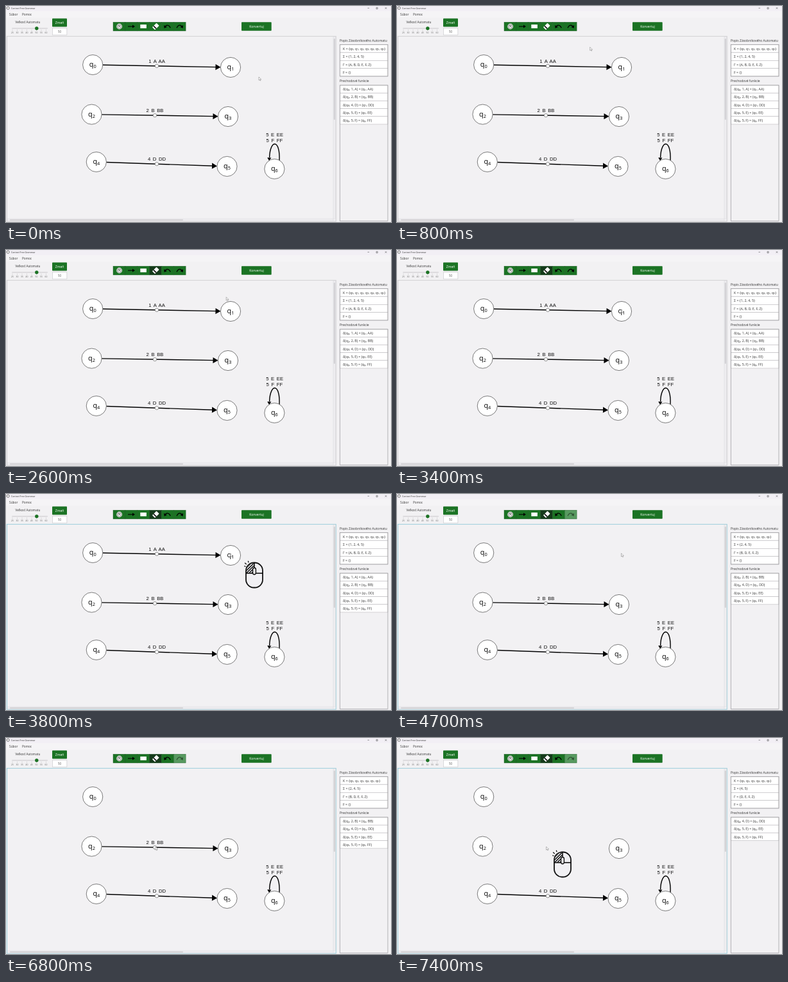
Recreate the animation shown at these times as an HTML page. Size 600 by 338 pixels, loop 8000 ms.

```html
<!DOCTYPE html>
<html lang="sk">
<head>
<meta charset="utf-8">
<title>Context Free Grammar</title>
<style>
  html, body { margin: 0; width: 100%; height: 100%; overflow: hidden; background: #f2f1f3; }
  svg { display: block; width: 600px; height: 338px; font-family: "Open Sans", "Noto Sans", sans-serif; fill: #333; }
  .tape { font: 7.7px "Liberation Sans", sans-serif; word-spacing: 1.5px; fill: #111; }
  .mid { text-anchor: middle; }
  .line { fill: none; stroke: #000; }
</style>
</head>
<body>
<svg id="stage" viewBox="0 0 600 338"></svg>
<script>
const LOOP = 8000, STEP = 100;
const GREEN = '#1b7324', DARK = '#143a1a', PALE = '#589a60';
const FOCUS_AT = 3600, CUTS = [3900, 7200];

const rect = (x, y, w, h, fill, more = '') =>
  `<rect x="${x}" y="${y}" width="${w}" height="${h}" fill="${fill}" ${more}/>`;
const text = (x, y, size, s, more = '') =>
  `<text x="${x}" y="${y}" font-size="${size}" ${more}>${s}</text>`;
const path = (d, more = '') => `<path d="${d}" ${more}/>`;
const group = (id, body, more = '') => `<g id="${id}" ${more}>${body}</g>`;

// Sets the digit after each q as a subscript
const subs = (s, size) => s.replace(/q(\d)(.?)/g, (_, n, next) =>
  `q<tspan dy="${size * .15}" font-size="${size * .68}">${n}</tspan>` +
  `<tspan dy="${-size * .15}">${next}</tspan>`);

const nodes = [[135.2, 92], [350, 96], [133.5, 169.6], [346, 173], [140.8, 244], [344.5, 251], [418.4, 255]];
const edges = [[0, 1, '1 A AA'], [2, 3, '2 B BB'], [4, 5, '4 D DD']];
const rules = [
  'δ(q0, 1, A) = (q1, AA)', 'δ(q2, 2, B) = (q3, BB)', 'δ(q4, 4, D) = (q5, DD)',
  'δ(q6, 5, E) = (q6, EE)', 'δ(q6, 5, F) = (q6, FF)'
];

function node([x, y], i) {
  return group('node' + i,
    `<circle cx="${x}" cy="${y}" r="15.6" fill="#fff" stroke="#444" stroke-width=".7"/>` +
    text(x, y + 3.4, 10.8, subs('q' + i, 10.8), 'class="mid" fill="#000"'));
}

function edge([from, to, label], i) {
  const [ax, ay] = nodes[from], [bx, by] = nodes[to];
  const len = Math.hypot(bx - ax, by - ay);
  const angle = Math.atan2(by - ay, bx - ax) * 180 / Math.PI;
  const mx = [235, 232, 235][i], my = ay + (by - ay) * (mx - ax) / (bx - ax);
  const tip = len - 15.5;
  return group('edge' + i,
    `<g transform="translate(${ax} ${ay}) rotate(${angle})">` +
    path(`M15.7 0H${tip - 6}`, 'class="line" stroke-width="1.4"') +
    path(`M${tip} 0l-8-4.6v9.2z`, 'fill="#000"') + '</g>' +
    `<circle cx="${mx}" cy="${my}" r="2.7" fill="#fff" stroke="#555" stroke-width=".6"/>` +
    `<text class="tape mid" x="${mx}" y="${my - 5}">${label}</text>`);
}

function header() {
  let s = rect(0, 0, 600, 8, '#f2eff5') + rect(0, 8, 600, 10, '#f5f4f6');
  s += '<circle cx="3.2" cy="3.2" r="2" fill="#fff" stroke="#333" stroke-width=".7"/>' +
    text(8, 4.5, 3.5, 'Context Free Grammar');
  s += path('M563.5 3.3h2.6M577 2.4h2.2v2.2h-2.2zM590.8 2.2l2.4 2.4m0-2.4l-2.4 2.4', 'class="line" stroke="#777" stroke-width=".4"');
  s += text(5, 14.8, 4.8, 'Súbor') + text(25, 14.8, 4.7, 'Pomoc');
  s += text(14.5, 27, 4.7, 'Veľkosť Automatu');
  s += rect(9, 34.3, 56, 1.4, '#d6d5d8', 'rx=".7"');
  for (let i = 0; i < 8; i++) {
    const x = 10 + i * 7.5;
    s += rect(x - .2, 37, .4, 1.6, '#999') + text(x, 42.8, 3.3, 25 + i * 5, 'class="mid" fill="#666"');
  }
  s += `<circle cx="47.8" cy="35" r="2.7" fill="${GREEN}"/>`;
  s += rect(72, 19.5, 23, 13, GREEN, 'rx=".8"') + text(83.6, 27.6, 5.1, 'Zmeň', 'class="mid" fill="#fff"');
  s += rect(72.3, 34.8, 22.6, 10.4, '#fff', 'stroke="#c4c3c6" stroke-width=".6"');
  s += text(83.6, 41.7, 4.4, '50', 'class="mid" fill="#555"');
  s += rect(367, 25.3, 46.7, 13.5, GREEN, 'rx=".8"');
  return s + text(390.5, 33.9, 5, 'Konvertuj', 'class="mid" fill="#fff"');
}

function toolbar() {
  let s = '';
  for (let i = 0; i < 6; i++)
    s += rect(167 + i * 18.85, 25.3, 18.85, 13.7, GREEN, `id="tool${i}" stroke="#125019" stroke-width=".4"`);
  s += '<circle cx="176.6" cy="32" r="4.4" fill="#fff"/>' +
    '<circle class="line" cx="176.6" cy="32" r="3.2" stroke-width=".5"/>' +
    text(176.6, 33.4, 3.8, 'N', 'class="mid" font-weight="700"');
  s += path('M190 32h8.5', 'class="line" stroke-width="1.1"') + path('M201 32l-4-2.6v5.2z', 'fill="#000"');
  s += rect(209.3, 29, 9.6, 5.8, '#fff');
  s += '<g transform="translate(233.3 32) rotate(-45)">' + rect(-4.6, -2.9, 9.2, 5.8, '#fff', 'rx=".6"') +
    rect(-2.6, -2.9, 1.6, 5.8, '#000') + '</g>';
  const turn = 'M247.5 33.5c1.5-4.5 6.5-4.8 8.7.8';
  const arrow = path(turn, 'class="line" stroke-width="1.3"') + path('M246.2 30l.4 4.8 4.2-1.7z', 'fill="#000"');
  return s + arrow + group('redo', arrow, 'transform="translate(522.3 0) scale(-1 1)"');
}

function pane() {
  const edge = 'stroke="#d3d2d5" stroke-width=".4"';
  let s = rect(1.5, 47.3, 512.7, 289.7, '#f2f1f3', 'id="pane" stroke="#c9c8cb" stroke-width=".8"');
  s += rect(510, 48, 3.6, 285, '#eeedf0', edge) + rect(510.6, 51, 2.4, 127, '#d3d2d5', 'rx="1"');
  return s + rect(2, 333, 508, 3.4, '#eeedf0', edge) + rect(6, 333.7, 270, 2.1, '#d3d2d5', 'rx="1"');
}

function loopEdge() {
  return path('M426 242C427.6 208.5 411.6 208 410.6 237', 'class="line" stroke-width="1.4"') +
    path('M410.2 242.3l-3-5.1 6.2.4z', 'fill="#000"') +
    '<text class="tape mid" x="418.6" y="204">5 E EE</text>' +
    '<text class="tape mid" x="418.3" y="213">5 F FF</text>';
}

function mouseIcon() {
  let hatch = '';
  for (let i = 0; i < 6; i++) hatch += `M0 ${5 + i * 4}l13-13`;
  return '<clipPath id="left"><path d="M1 16V13A12 12 0 0 1 12.5 1V8Q10 8 10 11V16z"/></clipPath>' +
    rect(0, 0, 26, 39, '#f2f1f3', 'rx="12.5" fill-opacity=".6" stroke="#111" stroke-width="1.8"') +
    path(hatch, 'class="line" stroke-width="1.3" clip-path="url(#left)"') +
    path('M0 16.5H10.5M15.5 16.5H26M13 0V8', 'class="line" stroke-width="1.5"') +
    rect(10.6, 8, 4.8, 10.5, '#f2f1f3', 'rx="2.4" stroke="#111" stroke-width="1.4"') +
    path('M-2.8 5.2l2.4.8M-1.8.2l2.6 2.4M3.2-2.8l1 2.6', 'class="line" stroke-width="1.2"');
}

// The two tables after a number of deletions
function panel(cut) {
  const size = 5.3, states = ['q0', 'q1', 'q2', 'q3', 'q4', 'q5', 'q6'].filter(q => !cut || q !== 'q1');
  const set = list => '{' + list.join(', ') + '}';
  const facts = [
    'K = ' + set(states), 'Σ = ' + set(['1', '2', '4', '5'].slice(cut)),
    'Γ = ' + set(['A', 'B', 'D', 'E', 'F', 'Z'].slice(cut)), 'F = {}'
  ];
  const table = (top, step, rows, height) =>
    rect(520.3, top, 74.7, height, '#f2f1f3') +
    rows.map((row, i) => rect(520.3, top + i * step, 74.7, step, '#fff', 'stroke="#bbbabd" stroke-width=".6"') +
      text(525, top + i * step + step / 2 + 2, size, subs(row, size))).join('') +
    rect(520.3, top, 74.7, height, 'none', 'stroke="#98979b" stroke-width=".7"');
  return text(520, 56, 5, 'Popis Zásobníkového Automatu') + table(60.5, 12.4, facts, 49.4) +
    text(520, 118.8, 5, 'Prechodové funkcie') + table(124, 12.2, rules.slice(cut), 212.3);
}

const stage = document.getElementById('stage');
stage.innerHTML = rect(0, 0, 600, 338, '#f2f1f3') + header() + toolbar() + pane() + group('panel', '') +
  edges.map(edge).join('') + loopEdge() + nodes.map(node).join('') + group('icon', mouseIcon()) +
  group('cursor', path('M0 0V5.2L1.3 4.1 2.2 6 3 5.6 2.2 3.8H3.8z', 'fill="#fff" stroke="#666" stroke-width=".45"'));

const part = id => document.getElementById(id);
const show = (id, on) => part(id).setAttribute('visibility', on ? 'visible' : 'hidden');
const place = (id, x, y) => part(id).setAttribute('transform', `translate(${x} ${y})`);

const smooth = p => p * p * (3 - 2 * p);
const start = p => p ** 1.1;
const settle = p => 1 - (1 - p) ** 1.6;

// time, x, y, easing on the way there
const track = [
  [300, 394, 111], [1200, 234, 31, smooth], [1300, 234, 31, smooth], [1900, 343, 73, smooth],
  [2500, 343, 73, smooth], [3400, 349.5, 92.8, smooth], [4900, 349.5, 92.8, smooth],
  [5900, 276.7, 127, start], [6800, 232.6, 170, settle]
];
// time the click hint appears, with its place
const hints = [[3600, 374, 107.5], [7000, 245, 178.5]];

function cursorAt(t) {
  if (t <= track[0][0]) return track[0].slice(1);
  const i = track.findIndex(k => k[0] >= t);
  if (i < 0) return track[track.length - 1].slice(1);
  const [t0, x0, y0] = track[i - 1], [t1, x1, y1, ease] = track[i];
  const p = ease((t - t0) / (t1 - t0));
  return [x0 + (x1 - x0) * p, y0 + (y1 - y0) * p];
}

let shown = -1;
function setCut(cut) {
  if (cut === shown) return;
  shown = cut;
  part('panel').innerHTML = panel(cut);
  show('edge0', cut < 1);
  show('node1', cut < 1);
  show('edge1', cut < 2);
  part('tool5').setAttribute('fill', cut ? PALE : GREEN);
  part('redo').setAttribute('opacity', cut ? .45 : 1);
}

function draw(t) {
  const [x, y] = cursorAt(t);
  place('cursor', x, y);
  setCut(CUTS.filter(c => t >= c).length);
  part('tool3').setAttribute('fill', t >= 1200 ? DARK : GREEN);
  part('pane').setAttribute('stroke', t >= FOCUS_AT ? '#86c5d6' : '#c9c8cb');
  const hint = hints.find(([at]) => t >= at && t < at + 1100);
  show('icon', hint);
  if (hint) {
    const age = t - hint[0];
    place('icon', hint[1], hint[2]);
    part('icon').setAttribute('opacity', Math.min(1, (age + 100) / 200, (1100 - age) / 200));
  }
}

function tick(now) {
  draw(Math.floor(now % LOOP / STEP) * STEP);
  requestAnimationFrame(tick);
}
tick(performance.now());
</script>
</body>
</html>
```
